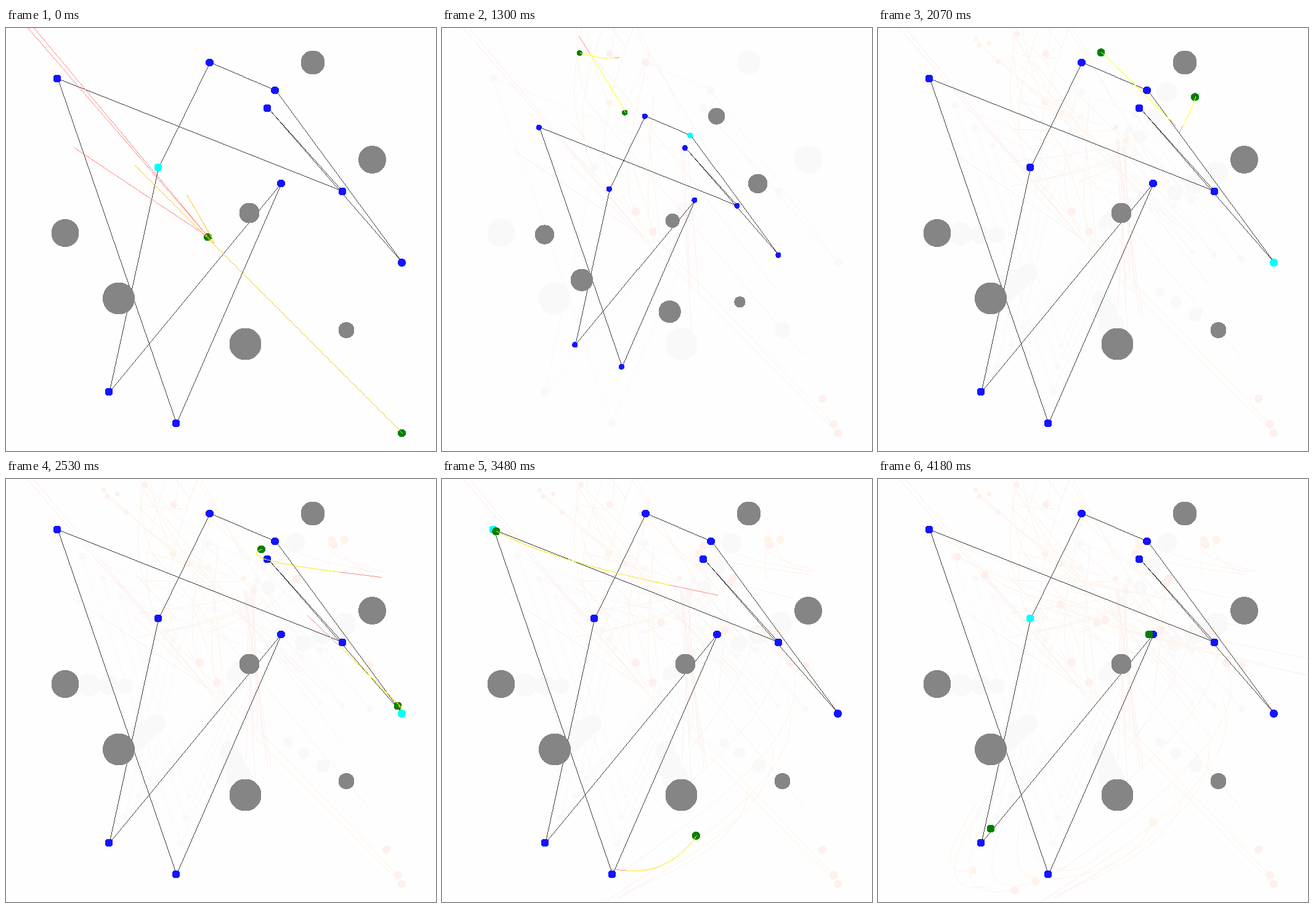
Write a matplotlib script that moves like this. It is 698x686 px and loops after 6030 ms.

```python
import math

import matplotlib.pyplot as plt
import numpy as np
from matplotlib.animation import FuncAnimation
from matplotlib.collections import LineCollection, PolyCollection

W, H, DPI = 698, 686, 64
LOOP, TICK = 6030, 30
START, STEP, LAST = 410, 46.54, 81   # first move, ms per step, final step
CENTER = np.array([326.6, 340.8])

BLUE, CYAN, GREEN, GREY, TRACK = "#1414ff", "#00ffff", "#008000", "#858585", "#404040"
RED, AMBER, YELLOW, GOLD = "#ff8c8c", "#ffc81e", "#ffff1e", "#ffe61e"
FAINT_RED, FAINT_AMBER, FAINT_GREY = "#ffefed", "#fff4ea", "#f9f9f9"

CHECKS = np.array([(247, 226), (330.5, 56), (436.5, 101), (642.5, 380.5), (424, 130),
                   (546, 265), (83, 82), (276, 641), (446.5, 252), (167, 590)])
ROCKS = [(96, 332.5, 22.5), (183, 438.5, 26), (388.5, 512.5, 26), (552.5, 490, 13),
         (594.5, 213.5, 22.5), (498, 56, 19.5), (395, 300, 16.5)]

hits = []


def hit(step, check):
    """A pod reaches a checkpoint."""
    hits.append(step)
    return (step, *CHECKS[check])


# waypoints: step, x, y
POD_A = np.array([(-1, 642.5, 657), (4, 604, 571), (10, 466, 258.5), hit(15, 1),
                  (25, 36, -217), (28, 98.5, -195), (46, 636, 368), hit(47, 3), hit(53, 5),
                  (58, 311.5, 223), hit(67, 6), (73, 173, 155.5), hit(81, 8)])
POD_A[-1, 1] -= 6.5   # stops at the rim of its goal
POD_B = np.array([(-1, 327.5, 339), (3, 354, 349), (10, 263.5, 242.5), hit(11, 0),
                  (18, 270, 60), (28, 455.7, 63), hit(30, 2), (40, 545, 98), (46, 414.5, 114),
                  hit(48, 4), (58, 565.5, 326), (64, 475, 532), hit(70, 7), (73, 221.5, 667),
                  (77, 154, 635), hit(79, 9), (81, 183, 567)])
PODS = POD_A, POD_B

# planned flight as an arc: bend and end, relative to the pod
AIM_STEPS = [-1, 10, 28, 46, 58, 73, LAST]
AIM_A = np.array([(-217, -217, -434, -434), (-71, -118, -168, -260), (139, 138, 278, 276),
                  (32, 27, -96, -97), (0, 0, 0, 0), (157, 85, 525, 163), (0, 0, 0, 0)])
AIM_B = np.array([(28, 36, -35, -68), (-48, -72, 24, -245), (24, 25, -138, 55),
                  (-44, 16, 126, 37), (55, 111, -210, 294), (-131, 21, -29, -151),
                  (0, 0, 0, 0)])
FIRST_TRIES = [(-293, -339), (-283, -339), (-218, -145)]


def place(pod, step):
    """Position on a cubic Hermite path that starts from rest."""
    t, pts = pod[:, 0], pod[:, 1:]
    slope = np.gradient(pts, t, axis=0)
    slope[0] = 0
    i = min(max(np.searchsorted(t, step, side="right") - 1, 0), len(t) - 2)
    d = t[i + 1] - t[i]
    u = (step - t[i]) / d
    return ((1 + 2 * u) * (1 - u) ** 2 * pts[i] + u * (1 - u) ** 2 * d * slope[i]
            + u * u * (3 - 2 * u) * pts[i + 1] + u * u * (u - 1) * d * slope[i + 1])


def zoom(step):
    """Zoom out by factors of 1.2 until both pods are in view."""
    top = min(place(p, step)[1] for p in PODS)
    need = max(1, (CENTER[1] - top) / CENTER[1])
    return 1.2 ** -math.ceil(math.log(need, 1.2) - 1e-9)


def view(pts, s):
    return CENTER + s * (np.asarray(pts, float) - CENTER)


ANGLE = np.linspace(0, 2 * np.pi, 48, endpoint=False)
RING = np.column_stack([np.cos(ANGLE), np.sin(ANGLE)])


def disc(xy, r, s):
    # aliased fills cover every pixel they touch, hence half a pixel less
    return view(xy, s) + (r * s - 0.5) * RING


def track(s):
    pts = view(CHECKS, s)
    return list(np.stack([pts, np.roll(pts, -1, axis=0)], axis=1))


def rocks(s):
    return [disc((x, y), r, s) for x, y, r in ROCKS]


def checks(s):
    return [disc(xy, 6.5, s) for xy in CHECKS]


def arc(pos, bend, end):
    u = np.linspace(0, 1, 60)[:, None]
    return pos + 2 * u * (1 - u) * bend + u * u * end


def trails(step):
    """Planned arcs and their outer, less certain parts, on screen."""
    if step >= LAST:
        return [], []
    sure, vague = [], []
    for pod, aims in zip(PODS, (AIM_A, AIM_B)):
        pos = view(place(pod, step), zoom(step))
        aim = np.array([np.interp(step, AIM_STEPS, col) for col in aims.T])
        bend, end = aim[:2], aim[2:]
        sure.append(arc(pos, bend, end))
        if step >= 0:
            vague.append(np.array([pos + end, pos + end + 0.4 * (end - bend)]))
    if step < 0:
        vague = [arc(pos, 0.25 * np.array(e), np.array(e)) for e in FIRST_TRIES]
    return sure, vague


def residue():
    """Pale leftovers as (birth step, points, colour): lines, then shapes."""
    rng = np.random.default_rng(11)
    lines, shapes = [], []
    for n in range(4):
        s, birth = 1.2 ** -n, 17 + 3 * n
        lines += [(birth, p, FAINT_GREY) for p in track(s)]
        shapes += [(birth, p, FAINT_GREY) for p in rocks(s) + checks(s)]
    for step in range(-1, LAST, 2):
        sure, vague = trails(step)
        lines += [(step + 2, p, FAINT_AMBER) for p in sure[step % 3 == 0:]]
        lines += [(step + 2, p, FAINT_RED) for p in vague]
        for pod in PODS:
            if rng.random() < 0.45:
                shapes.append((step + 2, disc(place(pod, step), 6.5, zoom(step)),
                               FAINT_RED if rng.random() < 0.6 else FAINT_AMBER))
    for birth in range(15, 28, 2):
        foot = rng.uniform(385, 435), rng.uniform(400, 500)
        lines.append((birth, np.array([(rng.uniform(385, 405), 180), foot]), FAINT_RED))
    return lines, shapes


OLD_LINES, OLD_SHAPES = residue()

fig = plt.figure(figsize=(W / DPI, H / DPI), dpi=DPI, facecolor="#fefefe")
ax = fig.add_axes([0, 0, 1, 1])
ax.set(xlim=(0, W), ylim=(H, 0))
ax.axis("off")


def shape_layer(z):
    return ax.add_collection(PolyCollection([], linewidths=0, antialiaseds=False, zorder=z),
                             autolim=False)


def pixel_layer(color, z):
    return ax.plot([], [], ",", color=color, zorder=z)[0]


old_shapes, discs = shape_layer(1), shape_layer(4)
old_lines = ax.add_collection(LineCollection([], linewidths=72 / DPI, zorder=2),
                              autolim=False)
course, red, gold = pixel_layer(TRACK, 3), pixel_layer(RED, 5), pixel_layer(GOLD, 6)


def fill(art, parts):
    art.set_verts([p for p, _ in parts])
    art.set_color([c for _, c in parts])


def trace(art, paths):
    """Draw paths as crisp lines, one pixel per step along the longer axis."""
    dots = [np.empty((0, 2))]
    for path in paths:
        for a, b in zip(path[:-1], path[1:]):
            n = int(np.abs(b - a).max()) + 1
            dots.append(a + (b - a) * np.linspace(0, 1, n + 1)[:, None])
    art.set_data(*(np.floor(np.vstack(dots)) + 0.5).T)


def draw(frame):
    step = math.floor((frame * TICK + 20 - START) / STEP + 0.3)
    step = min(max(step, -1), LAST)
    s = zoom(step)
    goal = sum(h <= step for h in hits) % len(CHECKS)
    fill(old_shapes, [(p, c) for b, p, c in OLD_SHAPES if b <= step])
    fill(old_lines, [(p, c) for b, p, c in OLD_LINES if b <= step])
    fill(discs, [(p, GREY) for p in rocks(s)]
         + [(p, CYAN if i == goal else BLUE) for i, p in enumerate(checks(s))]
         + [(disc(place(p, step), 6.5, s), GREEN) for p in PODS])
    sure, vague = trails(step)
    trace(course, track(s))
    trace(red, vague)
    trace(gold, sure)
    gold.set_color(AMBER if step < 0 else YELLOW if step < 40 else GOLD)
    return old_shapes, old_lines, course, discs, red, gold


anim = FuncAnimation(fig, draw, frames=LOOP // TICK, interval=TICK,
                     init_func=lambda: draw(0), repeat=True, repeat_delay=0, blit=False)
plt.show()
```
